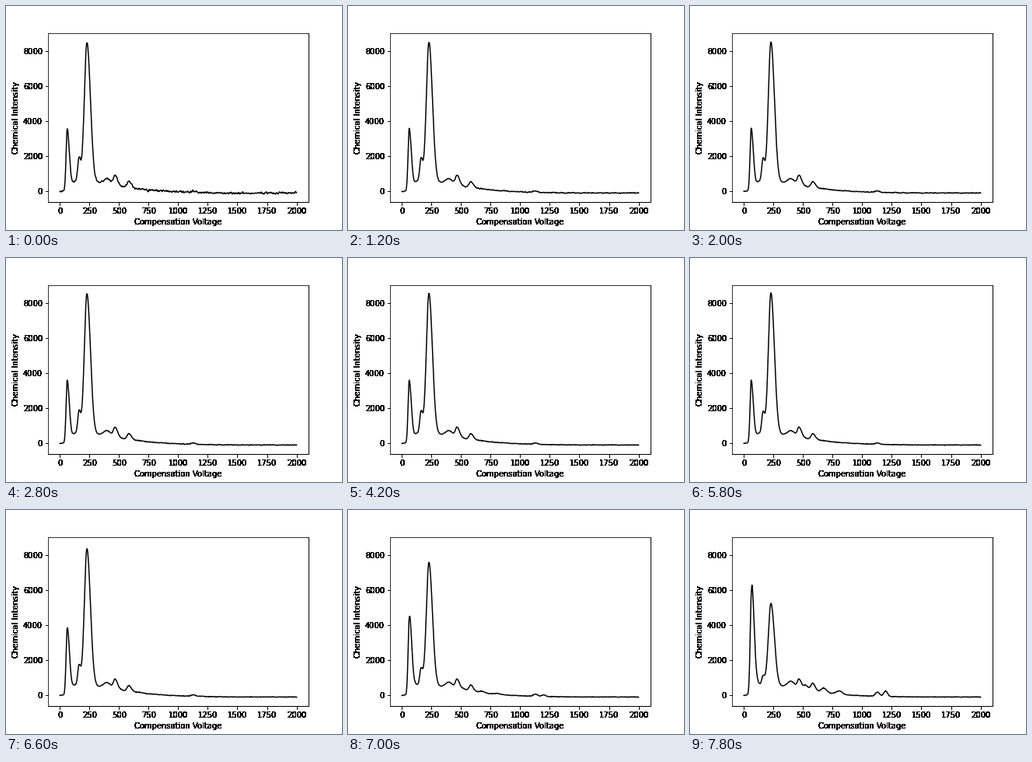
A matplotlib script that plays this animation: 432 px wide and 288 px high, repeating every 8000 ms.

```python
import numpy as np
import matplotlib.pyplot as plt
from matplotlib.animation import FuncAnimation

FRAMES, INTERVAL = 40, 200

plt.rcParams.update({"font.family": "DejaVu Sans", "font.size": 10})

# centre, left width, right width, height at rest, height at the end
PEAKS = [
    (62, 9.5, 18, 3550, 3550),
    (73, 13, 21, 0, 3050),
    (130, 30, 330, 560, 590),
    (162, 11, 14, 1190, 500),
    (229, 22, 29, 8050, 4680),
    (400, 32, 32, 320, 380),
    (466, 13, 22, 560, 540),
    (522, 15, 28, 0, 260),
    (582, 14, 22, 330, 440),
    (674, 22, 26, 20, 270),
    (810, 30, 22, 0, 200),
    (1128, 16, 18, 75, 240),
    (1198, 16, 16, 0, 320),
]
volts = np.linspace(0, 2000, 667)


def peak(centre, left, right):
    width = np.where(volts < centre, left, right)
    return np.exp(-0.5 * ((volts - centre) / width) ** 2)


def running_noise():
    """Noise that calms down like the mean of a growing number of scans."""
    rng = np.random.default_rng(7)
    raw = rng.normal(0, 50, (FRAMES, volts.size + 2))
    raw = 0.25 * raw[:, :-2] + 0.5 * raw[:, 1:-1] + 0.25 * raw[:, 2:]
    mean = np.cumsum(raw, axis=0) / np.arange(1, FRAMES + 1)[:, None]
    return mean + rng.normal(0, 6, volts.size)


noise = running_noise()
sag = -105 * (1 - np.exp(-(volts / 1100) ** 4))
rest = sag + sum(a * peak(c, l, r) for c, l, r, a, b in PEAKS)
change = sum((b - a) * peak(c, l, r) for c, l, r, a, b in PEAKS)
settling = 110 * peak(165, 12, 14) - 100 * peak(229, 15, 15)
lead = np.interp(volts, [150, 220], [0.81, 1])  # low voltages change sooner


def spectrum(frame):
    # flat at first, then bending into a steady climb
    shift = min(1, 0.144 * np.log1p(np.exp((frame - 33.45) / 0.8)))
    early = max(0, 1 - frame / 29)
    return rest + change * shift ** lead + settling * early + noise[frame]


def harden(img, dpi):
    """Turn every touched pixel fully opaque."""
    img[..., 3] = img[..., 3] > 0.06
    return img, 0, 0


fig = plt.figure(figsize=(6, 4), dpi=72, facecolor="white")
ax = fig.add_axes([0.125, 0.125, 0.775, 0.755])
ax.set(xlim=(-100, 2100), ylim=(-620, 9044),
       xticks=range(0, 2001, 250), yticks=range(0, 8001, 2000),
       xlabel="Compensation Voltage", ylabel="Chemical Intensity")
for part in (ax.xaxis, ax.yaxis, ax.spines["right"], ax.spines["bottom"]):
    part.set_agg_filter(harden)
line, = ax.plot(volts, spectrum(0), color="black", lw=1.5)


def update(frame):
    line.set_ydata(spectrum(frame))
    return line,


anim = FuncAnimation(fig, update, frames=FRAMES, interval=INTERVAL,
                     init_func=lambda: update(0), repeat=True, repeat_delay=0)
plt.show()
```
